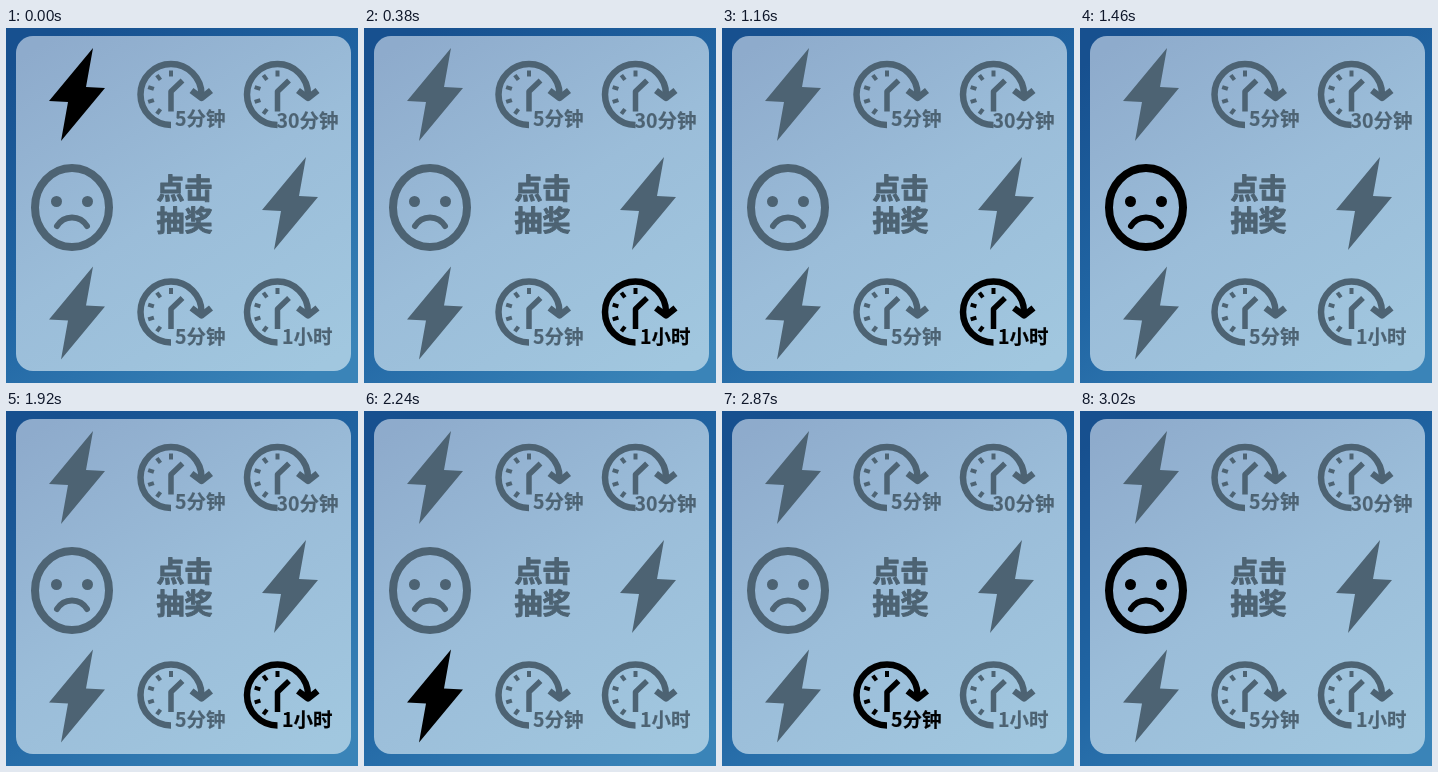
Recreate the animation shown at these times as an HTML page with a canvas. Size 352 by 355 pixels, loop 3170 ms.

```html
<!DOCTYPE html>
<html lang="zh-CN">
<head>
<meta charset="utf-8">
<style>
html, body { margin: 0; width: 100%; height: 100%; overflow: hidden; background: #1c5b9b; }
canvas { display: block; width: 352px; height: 355px; }
</style>
</head>
<body>
<canvas id="stage"></canvas>
<script>
const W = 352, H = 355, LOOP = 3170;
const IDLE = '#4d6373', ACTIVE = '#000';
const FONT = '"Noto Sans CJK SC", "Noto Sans CJK", "Noto Sans SC", sans-serif';

// Moments at which the highlight moves one cell clockwise
const STEPS = [
  70, 140, 210, 380, 460, 540, 610, 760, 840, 920, 990,
  1160, 1240, 1310, 1460, 1540, 1620, 1770, 1850, 1920, 2000,
  2170, 2250, 2320, 2400, 2550, 2630, 2700, 2870, 2950, 3020
];

const canvas = document.getElementById('stage');
const scale = window.devicePixelRatio || 1;
canvas.width = W * scale;
canvas.height = H * scale;
const ctx = canvas.getContext('2d');
ctx.scale(scale, scale);

function line(points, width) {
  ctx.lineWidth = width;
  ctx.beginPath();
  points.forEach(([x, y]) => ctx.lineTo(x, y));
  ctx.stroke();
}

function dot(x, y, r) {
  ctx.beginPath();
  ctx.arc(x, y, r, 0, Math.PI * 2);
  ctx.fill();
}

// The outline makes the strokes of the glyphs heavier
function text(str, x, y, size, outline) {
  ctx.font = `900 ${size}px ${FONT}`;
  ctx.lineWidth = outline;
  ctx.lineJoin = 'round';
  ctx.fillText(str, x, y);
  ctx.strokeText(str, x, y);
}

function gradient(x0, y0, x1, y1, colors) {
  const g = ctx.createLinearGradient(x0, y0, x1, y1);
  colors.forEach((c, i) => g.addColorStop(i / (colors.length - 1), c));
  return g;
}

// Origin: middle of the bolt
function bolt() {
  const half = [[16, -46.5], [9, -7.5], [28, -6.5]];
  ctx.beginPath();
  half.forEach(([x, y]) => ctx.lineTo(x, y));
  half.forEach(([x, y]) => ctx.lineTo(-x, -y));
  ctx.fill();
}

// Origin: middle of the dial
function clock(label, labelX, labelY) {
  const R = 30.5;
  ctx.lineWidth = 6.5;
  ctx.beginPath();
  ctx.arc(0, 0, R, Math.PI / 2, Math.PI * 2);
  ctx.stroke();
  line([[20.5, -4], [R, 3.5], [40, -4]], 6.5);
  line([[0, 17], [0, -3], [11.5, -14]], 5.5);
  for (let i = 0; i < 5; i++) {
    const a = Math.PI * (1.5 - i * 0.2);
    const c = Math.cos(a), s = Math.sin(a);
    line([[c * 18, s * 18], [c * 24, s * 24]], 4);
  }
  text(label, labelX, labelY, 19.5, 0.2);
}

// Origin: middle of the face
function sadFace() {
  ctx.lineWidth = 8;
  ctx.beginPath();
  ctx.ellipse(0, 0, 37, 39.5, 0, 0, Math.PI * 2);
  ctx.stroke();
  dot(-15.5, -6, 5.5);
  dot(15.5, -6, 5.5);
  ctx.lineWidth = 6;
  ctx.lineCap = 'round';
  ctx.beginPath();
  ctx.moveTo(-15, 18.5);
  ctx.bezierCurveTo(-8, 7, 8, 7, 15, 18.5);
  ctx.stroke();
}

// Clockwise from the top left
const cells = [
  [71, 66.5, bolt],
  [165, 66.5, () => clock('5分钟', 4, 31.5)],
  [271.5, 66.5, () => clock('30分钟', -1, 33)],
  [284, 175.5, bolt],
  [271.5, 284, () => clock('1小时', 4.5, 31.5)],
  [165, 284, () => clock('5分钟', 4, 31.5)],
  [71, 285, bolt],
  [66, 179.5, sadFace]
];

function background() {
  ctx.fillStyle = gradient(60, 0, 290, H, ['#17508f', '#2166a4', '#3a84b8']);
  ctx.fillRect(0, 0, W, H);
  ctx.fillStyle = gradient(60, 0, 290, H, ['#8eabcc', '#9bbdd9', '#a1c7df']);
  ctx.beginPath();
  ctx.roundRect(10, 8, 335, 335, 17);
  ctx.fill();
}

function draw(time) {
  const active = STEPS.filter(t => t <= time).length % cells.length;
  background();
  cells.forEach(([x, y, icon], i) => {
    ctx.save();
    ctx.translate(x, y);
    ctx.fillStyle = ctx.strokeStyle = i === active ? ACTIVE : IDLE;
    icon();
    ctx.restore();
  });
  ctx.fillStyle = ctx.strokeStyle = IDLE;
  text('点击', 150.5, 170.5, 28, 1);
  text('抽奖', 150.5, 203, 28, 1);
}

const start = performance.now();
function tick() {
  draw((performance.now() - start) % LOOP);
  requestAnimationFrame(tick);
}
tick();
</script>
</body>
</html>
```
